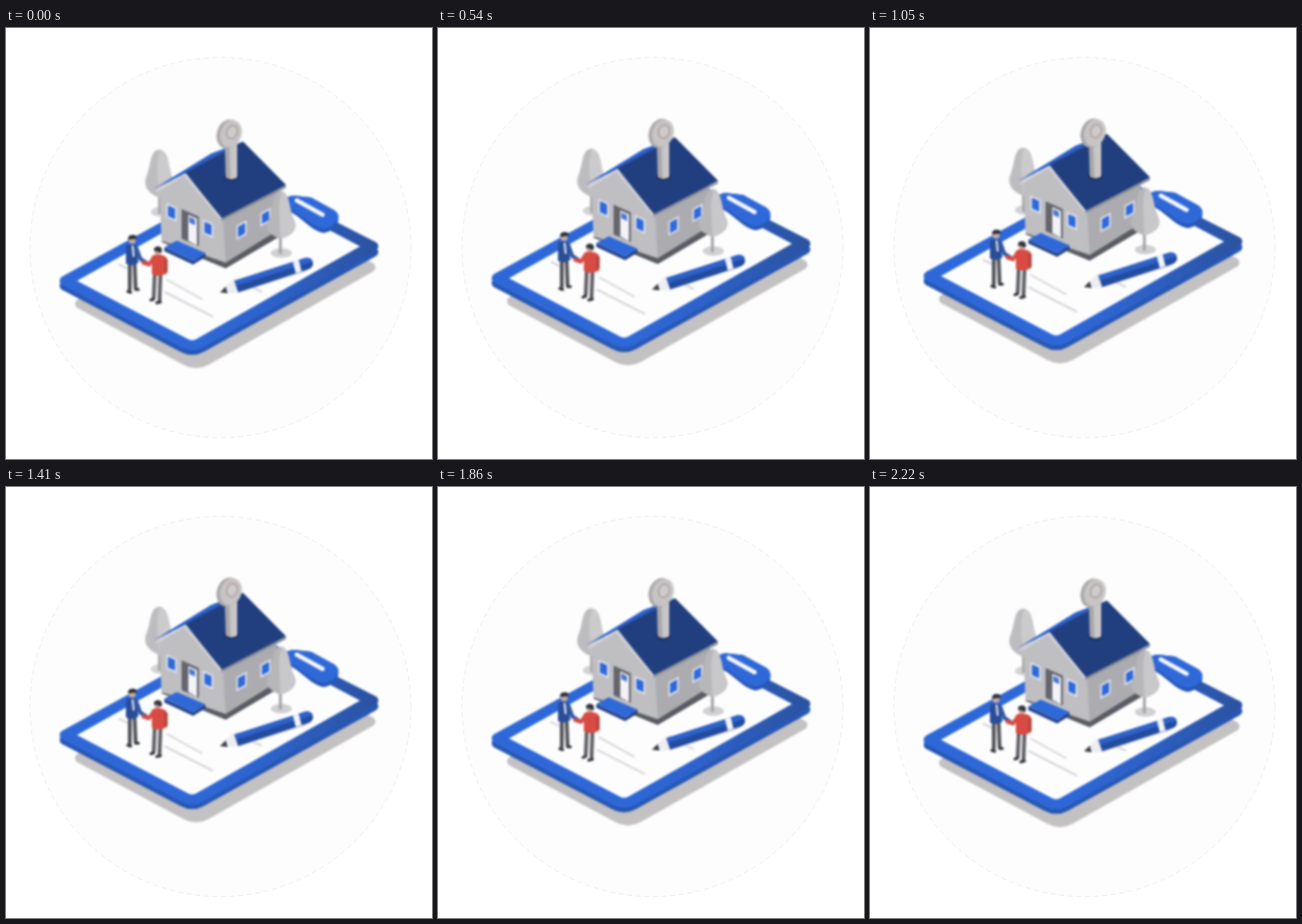
Write an HTML page that moves like this. It is 444x450 px and loops after 2.25 s.

```html
<!DOCTYPE html>
<html lang="en">
<head>
<meta charset="utf-8">
<title>House on a clipboard</title>
<style>
  html, body { margin: 0; width: 100%; height: 100%; overflow: hidden; background: #fff; }
  svg { display: block; width: 444px; height: 450px; }
  .soft { filter: blur(0.9px); }
  .line { fill: none; stroke-linecap: round; stroke-linejoin: round; }
</style>
</head>
<body>
<svg viewBox="0 0 444 450">
  <defs>
    <linearGradient id="rim" gradientUnits="userSpaceOnUse" x1="200" y1="0" x2="388" y2="0">
      <stop offset="0" stop-color="#2e68d8"/>
      <stop offset="0.4" stop-color="#2d62cb"/>
      <stop offset="1" stop-color="#2b529f"/>
    </linearGradient>
  </defs>
  <circle cx="223.5" cy="229.2" r="198.5" fill="#fdfdfd" stroke="#eee" stroke-dasharray="5 4"/>
  <g class="soft">
    <g id="board">
      <g stroke-width="10" stroke-linejoin="round">
        <path d="M77 288L187 347Q198 353 209 347L380 250L252 180Z" fill="#c3c1c2" stroke="#c3c1c2"/>
        <path d="M61 269L184 333.500Q194 339 204 333.500L383 234L250 165Z" fill="#2857b3" stroke="#2857b3"/>
        <path d="M61 264L184 328.500Q194 334 204 328.500L383 228L250 160Z" fill="url(#rim)" stroke="url(#rim)"/>
      </g>
      <path d="M74 264L190 325Q194 327 198 325L369 228L250 165Z" fill="#fdfdfe"/>
      <path d="M291 182Q292 175 300 175L318 177L342 191Q348 195 346 203Q342 212 331 214Q325 213 318 208L303 196L292 189Z" fill="#2756b5"/>
      <path d="M291 181Q292 175 300 175L318 177L342 190Q348 194 346 200Q342 208 331 210Q325 209 319 205L303 193L292 187Z" fill="#2f68d8"/>
      <path class="line" d="M303 180L330 195" stroke="#f4f6fc" stroke-width="4.5"/>
      <g class="line" stroke="#d7d7da" stroke-width="2">
        <path d="M168 263L204 283M166 276L215 301M118 247L126 251M240 263L266 275"/>
      </g>
    </g>

    <g id="leftTree">
      <ellipse cx="161" cy="192" rx="10" ry="5" fill="#d3d2d4"/>
      <path d="M160 170V194" stroke="#a5a4a7" stroke-width="3"/>
      <path d="M160 127C150 127 151 143 147 153C142 164 147 172 159 177C171 174 177 168 174 158C169 147 171 129 160 127Z" fill="#bdbcbe"/>
      <path d="M161 127C155 141 159 160 160 177C171 174 177 168 174 158C169 147 171 130 161 127Z" fill="#cbcacc"/>
    </g>

    <g id="house">
      <path d="M161 223L229 251L283 219L276 208L220 213Z" fill="#595c63"/>
      <path d="M154 168L214 131L247 118.500L187 152Z" fill="#2b60cb"/>
      <path d="M187 152L160 170L162 222L229 245V198Z" fill="#bfbfc2"/>
      <path d="M226 197L282 168V212L229 245Z" fill="#acacb0"/>
      <path d="M187 151L247 118.500L292 164L225 199Z" fill="#213f7f"/>
      <path class="line" d="M157 170L186 153L224 199" stroke="#d5d6dc" stroke-width="2"/>
      <path class="line" d="M225 200L291 166" stroke="#8c8e98" stroke-width="2"/>
      <path d="M183 189L201 197V228L183 220Z" fill="#64656d"/>
      <path d="M190 195L199 199V227L190 222Z" fill="#f3f3f7"/>
      <path d="M191 197L197 200V206L191 203Z" fill="#4b77cf"/>
      <g stroke="#e5e9f4" stroke-width="1.5">
        <path d="M168 184L177 188V201L168 197Z" fill="#2f68d8"/>
        <path d="M206 201L215 205V218L206 214Z" fill="#2f68d8"/>
        <path d="M241 207L250 202V215L241 220Z" fill="#2f68d8"/>
        <path d="M266 194L275 189V201L266 206Z" fill="#2f68d8"/>
      </g>
      <path d="M165 229L195 243L208 235V239L195 247L165 233Z" fill="#27458a"/>
      <path d="M165 229L178 222L208 235L195 243Z" fill="#2f68d8"/>
    </g>

    <g id="key">
      <ellipse cx="235" cy="156" rx="8" ry="4" fill="#1b2f63"/>
      <path d="M228 118L241 121V156Q235 160 229 156Z" fill="#aaa8aa"/>
      <path d="M233 120L241 121V156L234 158Z" fill="#c9c6c7"/>
      <g transform="rotate(18 233 110)">
        <ellipse cx="232" cy="111" rx="12" ry="15.5" fill="#aaa8aa"/>
        <ellipse cx="234.500" cy="110" rx="11" ry="14.500" fill="#c8c4c5"/>
        <ellipse cx="235" cy="108" rx="5.500" ry="7" fill="#d0cbcb" stroke="#b3a9a9" stroke-width="2"/>
      </g>
    </g>

    <g id="rightTree">
      <ellipse cx="287" cy="235" rx="11" ry="5" fill="#d0cfd1"/>
      <path d="M286 212V236" stroke="#a2a1a5" stroke-width="3"/>
      <path d="M286 170C277 171 279 188 275 198C268 208 273 216 286 220C298 217 305 210 300 200C295 189 296 172 286 170Z" fill="#b7b6b9"/>
      <path d="M288 170C282 184 286 203 286 220C298 217 305 210 300 200C295 189 296 173 288 170Z" fill="#c8c7c9"/>
    </g>

    <g id="items">
      <path class="line" d="M242 274L312 252" stroke="#dddde1" stroke-width="5"/>
      <path d="M223 276L236 263L243 260L247 274L238 277Z" fill="#eeeef1"/>
      <path d="M223 276L229 270L231 277Z" fill="#3b3e48"/>
      <path d="M238 264L312 240Q320 239 320 246Q320 250 315 252L242 276Z" fill="#234b9e"/>
      <path d="M238 264L312 240Q318 239 319 244L240 269Z" fill="#2d62cb"/>
      <path d="M299 244L305 242L308 254L302 256Z" fill="#f3f4f8"/>

      <g class="line">
        <path d="M129 245V273M134 245L135 271" stroke="#55565d" stroke-width="4"/>
        <path d="M127 275L130 276M135 273L138 273" stroke="#33353c" stroke-width="3"/>
        <path d="M125 227Q131 224 136 227L138 245Q131 250 125 246Z" fill="#294e99"/>
        <path d="M136 230L140 241L146 245" stroke="#3159a5" stroke-width="4"/>
        <path d="M132 228L133 238" stroke="#eceef4" stroke-width="2"/>
        <circle cx="131.500" cy="222" r="3.500" fill="#c9aaa0"/>
        <path d="M127 221Q127 216 132 216Q137 216 136 220Z" fill="#2d2f38"/>

        <path d="M155 257L154 281M161 256L160 284" stroke="#606067" stroke-width="4"/>
        <path d="M151 284L154 283M157 287L161 286" stroke="#36373d" stroke-width="3"/>
        <path d="M152 238Q159 234 167 239L168 256Q160 261 152 257Z" fill="#d74b42"/>
        <path d="M153 241L149 247L143 245" stroke="#d74b42" stroke-width="4"/>
        <path d="M167 242V254" stroke="#a9443f" stroke-width="3"/>
        <circle cx="158" cy="233" r="3.500" fill="#c7a298"/>
        <path d="M154 232Q154 228 159 228Q164 229 162 235Z" fill="#33343d"/>
      </g>
    </g>
  </g>
</svg>
<script>
  const LOOP = 2250;
  // How far each part floats up, in pixels.
  const parts = Object.entries({
    board: 5, items: 5.5, house: 8, leftTree: 2, rightTree: 3.5, key: 1
  }).map(([id, rise]) => ({ node: document.getElementById(id), rise }));

  function ease(t, from, to) {
    const u = Math.min(1, Math.max(0, (t - from) / (to - from)));
    return u * u * (3 - 2 * u);
  }

  function draw(time) {
    const t = time % LOOP;
    const step = t < 630 ? 90 : 30;
    const held = Math.floor(t / step) * step;
    const lift = ease(held, 60, 960) - ease(held, 1450, 2100);
    for (const { node, rise } of parts) {
      node.setAttribute("transform", `translate(0 ${(-rise * lift).toFixed(2)})`);
    }
  }

  const start = performance.now();
  function tick() {
    draw(performance.now() - start);
    requestAnimationFrame(tick);
  }
  tick();
</script>
</body>
</html>
```
